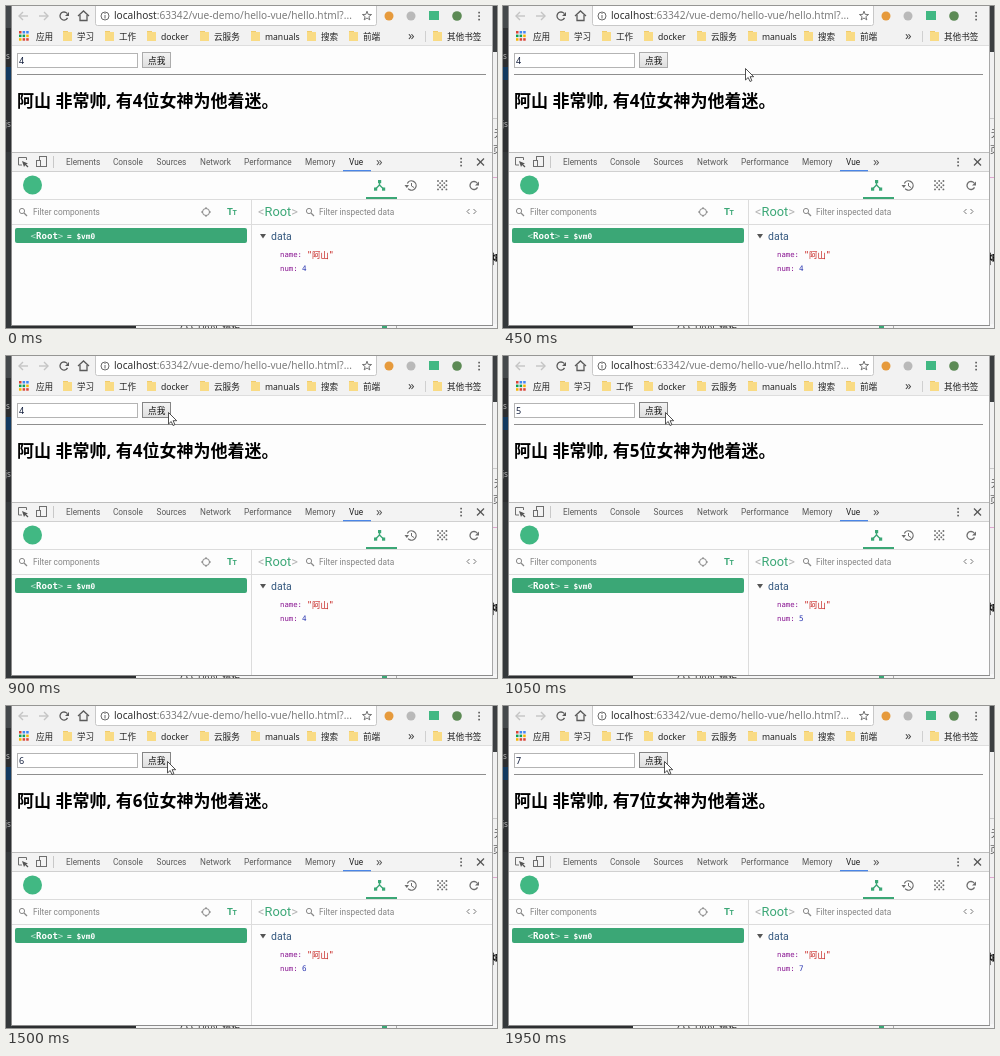
An HTML page with a canvas that plays this animation: 491x322 px, repeating every 2100 ms.

```html
<!DOCTYPE html>
<html lang="zh">
<head>
<meta charset="utf-8">
<title>Counter demo</title>
<style>
html, body { margin: 0; width: 100%; height: 100%; overflow: hidden; background: #fff; }
canvas { display: block; }
</style>
</head>
<body>
<canvas id="stage" width="491" height="322"></canvas>
<script>
const ctx = document.getElementById('stage').getContext('2d');
const UI = '"Noto Sans", "Noto Sans CJK SC", sans-serif';
const PANEL = 'Roboto, "Noto Sans CJK SC", sans-serif';
const MONO = '"DejaVu Sans Mono", "Noto Sans CJK SC", monospace';
const GREEN = '#3ba776', GREY = '#6e6e6e', LINE = '#dcdcdc';
const LOOP = 2100, STEP = 150;
const PERSON = '阿山';

function box(x, y, w, h, color) {
  ctx.fillStyle = color;
  ctx.fillRect(x, y, w, h);
}

function frame(x, y, w, h, color) {
  ctx.strokeStyle = color;
  ctx.lineWidth = 1;
  ctx.strokeRect(x + 0.5, y + 0.5, w - 1, h - 1);
}

function roundBox(x, y, w, h, r, fill, stroke) {
  ctx.beginPath();
  ctx.roundRect(x, y, w, h, r);
  if (fill) { ctx.fillStyle = fill; ctx.fill(); }
  if (stroke) { ctx.strokeStyle = stroke; ctx.lineWidth = 1; ctx.stroke(); }
}

function disc(x, y, r, color) {
  ctx.beginPath();
  ctx.arc(x, y, r, 0, Math.PI * 2);
  ctx.fillStyle = color;
  ctx.fill();
}

function arc(x, y, r, color, from = 0, to = Math.PI * 2, width = 1) {
  ctx.beginPath();
  ctx.arc(x, y, r, from, to);
  ctx.strokeStyle = color;
  ctx.lineWidth = width;
  ctx.stroke();
}

function path(points, color, width = 1, fill) {
  ctx.beginPath();
  points.forEach(([x, y]) => ctx.lineTo(x, y));
  if (fill) {
    ctx.closePath();
    ctx.fillStyle = fill;
    ctx.fill();
  }
  if (color) {
    ctx.strokeStyle = color;
    ctx.lineWidth = width;
    ctx.stroke();
  }
}

// Draws text on a baseline and returns the x where it ends.
function text(str, x, y, size, color, family = UI, weight = 400) {
  ctx.font = `${weight} ${size}px ${family}`;
  ctx.fillStyle = color;
  ctx.fillText(str, x, y);
  return x + ctx.measureText(str).width;
}

function dots(x, y, color) {
  for (let i = -1; i <= 1; i++) box(x - 0.7, y + i * 3.5 - 0.7, 1.6, 1.6, color);
}

function magnifier(x, y) {
  arc(x - 1, y - 1, 2.6, '#888');
  path([[x + 1, y + 1], [x + 4, y + 4]], '#888', 1.2);
}

function reload(x, y, r, color) {
  arc(x, y, r, color, 0.5, 5.6, 1.3);
  path([[x + r + 1, y - r], [x + r + 1, y], [x + 1, y]], null, 0, color);
}

function folder(x) {
  box(x, 25, 5, 3, '#f0cb6c');
  box(x, 26, 9, 9, '#f9db84');
}

function backdrop() {
  box(0, 0, 491, 322, '#2d2f31');
  box(0, 0, 6, 22, '#45494b');
  box(0, 61, 6, 13, '#123a60');
  box(0, 146, 6, 176, '#34383a');
  text('s', 0, 53, 8, '#b5b5b5');
  text('js', -1, 121, 8, '#b5b5b5');
  box(486, 0, 5, 46, '#3c3f41');
  box(486, 46, 5, 276, '#f1f1f1');
  box(486, 112, 5, 1, '#c9c9c9');
  text('无', 488, 131, 9, '#444');
  text('页面', 487, 147, 9, '#444');
  box(486, 171, 5, 1, '#dfa6cf');
  text('神', 484, 257, 13, '#111', UI, 700);
  box(130, 318, 361, 4, '#f6f6f6');
  box(390, 318, 1, 4, '#aaa');
  text('CSS U(V)L 模板', 174, 326, 9, '#333');
  box(376, 319, 5, 3, GREEN);
}

function toolbar() {
  box(6, 0, 480, 40, '#f2f2f2');
  path([[22, 10], [13, 10]], '#c4c4c4', 1.4);
  path([[17, 6], [13, 10], [17, 14]], '#c4c4c4', 1.4);
  path([[33, 10], [42, 10]], '#c4c4c4', 1.4);
  path([[38, 6], [42, 10], [38, 14]], '#c4c4c4', 1.4);
  reload(58, 10, 4, '#5a5a5a');
  path([[72, 10], [77.5, 5], [83, 10]], '#5a5a5a', 1.3);
  path([[74, 9], [74, 14.5], [81, 14.5], [81, 9]], '#5a5a5a', 1.3);

  roundBox(89.5, -3.5, 281, 23, 2, '#fff', '#c8c8c8');
  arc(99, 10, 4, '#6a6a6a');
  box(98.5, 9, 1, 3.5, '#6a6a6a');
  box(98.5, 7, 1, 1, '#6a6a6a');
  const end = text('localhost', 108, 13, 10.15, '#303030');
  text(':63342/vue-demo/hello-vue/hello.html?...', end, 13, 10.15, '#7c7c7c');
  const star = Array.from({ length: 10 }, (_, i) => {
    const a = i * Math.PI / 5 - Math.PI / 2, r = i % 2 ? 2 : 4.8;
    return [361 + r * Math.cos(a), 10 + r * Math.sin(a)];
  });
  path([...star, star[0]], '#666', 0.9);

  disc(383, 10, 4.5, '#e69a3c');
  disc(405, 10, 4.5, '#b9b9b9');
  box(423, 5, 10, 9, '#41b883');
  disc(451, 10, 4.8, '#5c8a55');
  dots(473, 10, '#555');

  const hues = ['#db4437', '#f4b400', '#0f9d58', '#4285f4'];
  for (let i = 0; i < 9; i++) {
    box(13 + i % 3 * 3.6, 25 + Math.floor(i / 3) * 3.6, 2.5, 2.5, hues[(i * 3 + (i >> 1)) % 4]);
  }
  text('应用', 30, 33.5, 8.6, '#222');
  const marks = [['学习', 57], ['工作', 99], ['docker', 141], ['云服务', 194],
    ['manuals', 245], ['搜索', 301], ['前端', 343], ['其他书签', 427]];
  for (const [label, x] of marks) {
    folder(x);
    text(label, x + 14, 33.5, 8.6, '#222');
  }
  text('»', 402, 34, 13, '#444');
  box(419, 25, 1, 11, '#d0d0d0');
  box(6, 39, 480, 1, '#dedede');
}

function page(count, hover) {
  box(6, 40, 480, 106, '#fdfdfd');
  box(11, 47, 121, 15, '#fff');
  frame(11, 47, 121, 15, '#b4b4b4');
  text(count, 13, 58, 9, '#111d3c');
  const face = ctx.createLinearGradient(0, 46, 0, 62);
  face.addColorStop(0, '#f4f4f4');
  face.addColorStop(1, '#dedede');
  box(136, 46, 29, 16, face);
  frame(136, 46, 29, 16, hover ? '#858585' : '#acacac');
  text('点我', 142, 57.7, 8.7, '#111');
  box(11, 68, 469, 1, '#8e8e8e');
  text(`${PERSON} 非常帅, 有${count}位女神为他着迷。`, 11, 100.6, 17, '#000', UI, 700);
}

function devtoolsTabs() {
  box(6, 146, 480, 20, '#f3f3f3');
  box(6, 146, 480, 1, '#bdbdbd');
  box(6, 165, 480, 1, '#d0d0d0');
  path([[16, 159], [12.5, 159], [12.5, 151.5], [20.5, 151.5], [20.5, 154]], GREY);
  path([[16, 155], [22, 157.5], [19.5, 158.5], [18, 161]], null, 0, '#555');
  path([[19, 158], [22, 161]], '#555', 1.2);
  frame(33, 150, 8, 11, GREY);
  box(30, 154, 5, 7, '#f3f3f3');
  frame(30, 154, 5, 7, GREY);
  box(47, 150, 1, 12, '#c8c8c8');
  const tabs = [['Elements', 60], ['Console', 107], ['Sources', 150.5], ['Network', 194],
    ['Performance', 238], ['Memory', 299], ['Vue', 343]];
  for (const [label, x] of tabs) {
    text(label, x, 158.7, 8.25, label === 'Vue' ? '#222' : '#5a5a5a', PANEL);
  }
  box(337, 164, 28, 1.3, '#4a86e8');
  text('»', 370, 159.5, 13, '#555');
  dots(455, 156, '#555');
  path([[471, 152.5], [478, 159.5]], '#555', 1.2);
  path([[478, 152.5], [471, 159.5]], '#555', 1.2);
}

function panelHeader() {
  box(6, 166, 480, 153, '#fdfdfd');
  disc(26.5, 179, 9.5, '#41b883');

  path([[373.5, 176], [373.5, 180]], GREEN, 1.3);
  path([[369.5, 183], [373.5, 179], [377.5, 183]], GREEN, 1.3);
  box(372, 174, 3.2, 3.2, GREEN);
  box(368, 181.5, 3.2, 3.2, GREEN);
  box(376, 181.5, 3.2, 3.2, GREEN);
  box(360, 191, 31, 2, GREEN);

  arc(405.5, 179.5, 4.6, GREY, -2.7, 2.4, 1.2);
  path([[398.5, 179], [403, 179], [400.8, 182]], null, 0, GREY);
  path([[405.5, 177], [405.5, 180], [408, 181.5]], GREY);
  for (let i = 0; i < 25; i += 2) {
    disc(432 + i % 5 * 2.1, 175 + Math.floor(i / 5) * 2.1, 0.95, GREY);
  }
  reload(468, 179.5, 4, GREY);

  box(6, 193, 480, 1, LINE);
  box(6, 218, 480, 1, LINE);
  box(245, 193, 1, 126, LINE);
  magnifier(17, 206);
  text('Filter components', 27, 208.5, 8.3, '#858585', PANEL);
  arc(200, 206, 3.5, '#888');
  for (const [dx, dy] of [[0, 1], [0, -1], [1, 0], [-1, 0]]) {
    path([[200 + dx * 3, 206 + dy * 3], [200 + dx * 5, 206 + dy * 5]], '#888');
  }
  const end = text('T', 221, 209, 9.5, GREEN, PANEL, 700);
  text('T', end - 0.4, 209, 7, GREEN, PANEL, 700);

  let x = text('<', 252, 209.5, 12.8, '#b6b6b6', PANEL);
  x = text('Root', x, 209.5, 12.8, GREEN, PANEL);
  text('>', x, 209.5, 12.8, '#b6b6b6', PANEL);
  magnifier(304, 206);
  text('Filter inspected data', 313, 208.5, 8.3, '#858585', PANEL);
  path([[463.5, 203], [461, 205.5], [463.5, 208]], '#777');
  path([[467.5, 203], [470, 205.5], [467.5, 208]], '#777');
}

function inspector(count) {
  roundBox(9, 222, 232, 15, 2, GREEN);
  let x = text('<', 24.5, 232.8, 9.1, '#bfe6d3', MONO);
  x = text('Root', x, 232.8, 9.1, '#fff', MONO, 700);
  text('>', x, 232.8, 9.1, '#bfe6d3', MONO);
  text('= $vm0', 61, 232.8, 7.8, '#fff', MONO, 700);

  path([[254, 228], [260, 228], [257, 232.5]], null, 0, '#555');
  text('data', 265, 233.5, 10.5, '#36597f', PANEL);
  text('name:', 274, 251, 7.3, '#881391', MONO);
  text(`"${PERSON}"`, 301, 251.5, 8.4, '#c41a16', MONO);
  text('num:', 274, 265, 7.3, '#881391', MONO);
  text(count, 296, 265, 7.6, '#2a36b0', MONO);
}

function windowEdge() {
  box(5, 0, 1, 319, '#8c8c8c');
  box(486, 0, 1, 319, '#a8a8a8');
  box(5, 319, 482, 1, '#8c8c8c');
}

function pointer([x, y]) {
  const shape = [[0, 0], [0, 11.5], [2.7, 9], [4.5, 13], [6.4, 12.1], [4.6, 8.2], [8.2, 8.2], [0, 0]];
  path(shape.map(([dx, dy]) => [x + 0.5 + dx, y + 0.5 + dy]), '#333', 0.85, '#fff');
}

function pointerAt(time) {
  if (time < 300) return null;
  if (time < 450) return [348, 84];
  if (time < 600) return [242, 62];
  if (time < 750) return [178, 57];
  return time < 1200 ? [162, 56] : [161, 55];
}

function draw(time) {
  const clicks = time < 1050 ? 0 : 1 + Math.floor((time - 1050) / 450);
  const count = String(4 + clicks);
  const tip = pointerAt(time);
  backdrop();
  toolbar();
  page(count, time >= 750);
  devtoolsTabs();
  panelHeader();
  inspector(count);
  windowEdge();
  if (tip) pointer(tip);
}

function tick() {
  const time = performance.now() % LOOP;
  draw(Math.floor(time / STEP) * STEP);
  requestAnimationFrame(tick);
}
tick();
</script>
</body>
</html>
```
